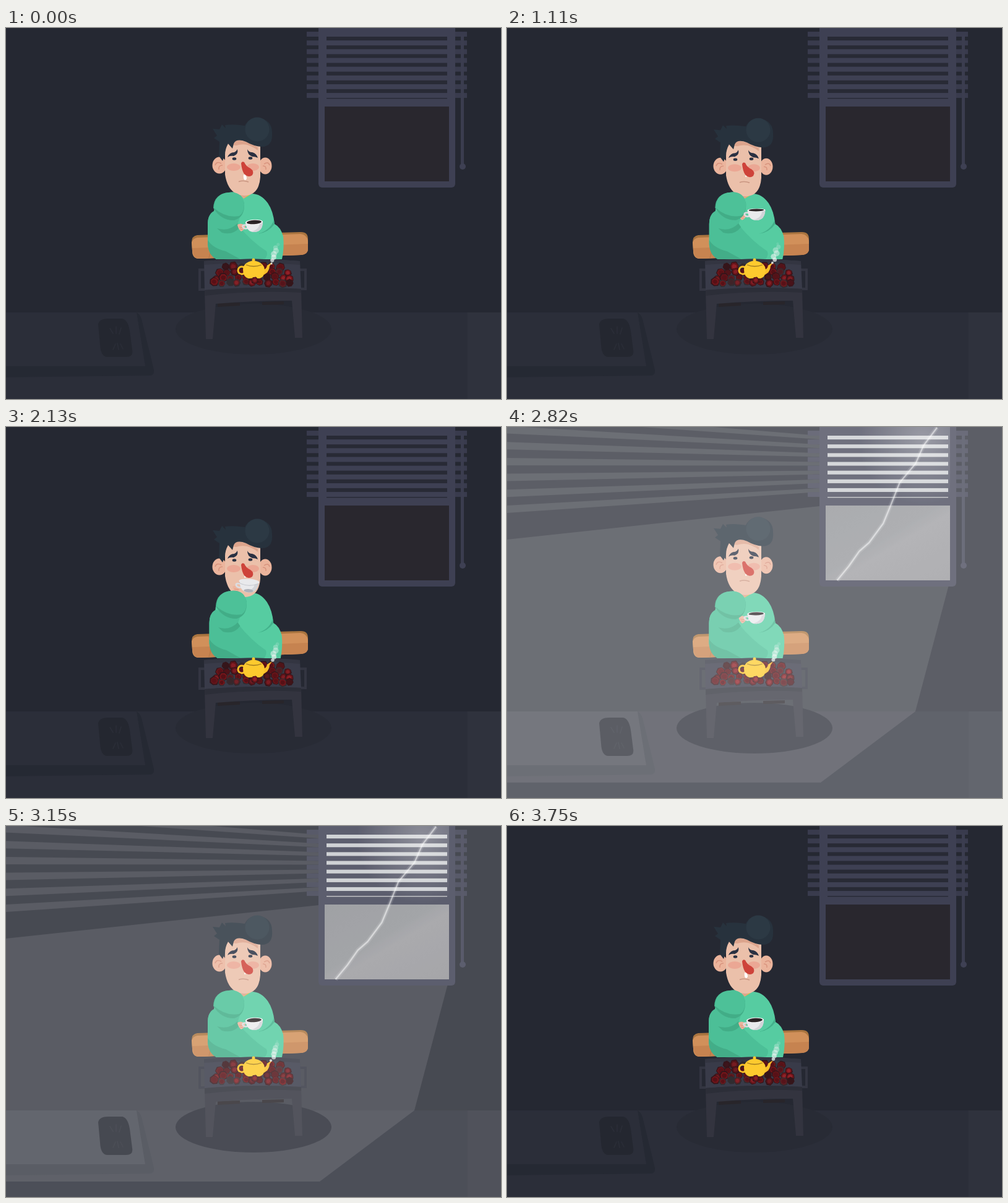
These frames come from a looping animation (800x600 px, 3.78 s). An HTML page:

```html
<!DOCTYPE html>
<html lang="en">
<head>
<meta charset="utf-8">
<title>Sick day</title>
<style>
html, body { margin: 0; width: 100%; height: 100%; overflow: hidden; background: #252832; }
svg { display: block; width: 800px; height: 600px; }
</style>
</head>
<body>
<svg viewBox="0 0 800 600">
  <rect width="800" height="600" fill="#252832"/>
  <rect y="460" width="800" height="140" fill="#2b2e39"/>
  <rect x="746" y="460" width="54" height="140" fill="#2f323d"/>
  <path d="M211 460Q217 464 219 471L239 553Q240 562 232 562L0 565V547H225Z" fill="#252933"/>

  <!-- light thrown into the room -->
  <g id="roomLight" fill="#fff" fill-opacity=".1">
    <path d="M0 182L514 127H716V248L660 460L507 575H0Z"/>
  </g>
  <path d="M0 460H211L225 547H0Z" fill="#2b2e39"/>
  <path id="rugLight" d="M0 460H211L225 547H0Z" fill="#fff" fill-opacity=".13"/>
  <g fill="none" stroke="#2b2e38" stroke-width="1.5" stroke-linecap="round">
    <path d="M149 479Q151 470 165 470H188Q197 472 200 490L204 521Q206 532 194 532H164Q153 532 152 512Z" fill="#242730" stroke="none"/>
    <path d="M168 486L173 494M178 483V494M186 485L183 495M173 520L177 511M180 510L182 520M185 511L189 519"/>
  </g>
  <ellipse cx="400" cy="487" rx="126" ry="41" fill="#282b35"/>

  <!-- window -->
  <g id="slats" fill="#393b4d"></g>
  <rect x="505" y="-10" width="221" height="268" rx="6" fill="#3e4053"/>
  <rect x="515" y="127" width="201" height="121" fill="#29272e"/>
  <rect x="518" y="113" width="195" height="1.5" fill="#292b37"/>
  <g id="gaps" fill="#282a35"></g>
  <path d="M737.500 12V220" stroke="#3b3d4f" stroke-width="5"/>
  <circle cx="738" cy="224" r="5" fill="#3e4053"/>
  <g id="sky">
    <rect x="515" y="127" width="201" height="121" fill="url(#glass)"/>
    <g id="skyGaps" fill="#c6c9cd"></g>
    <rect x="518" y="113" width="195" height="1.500" fill="#b5b7bb"/>
    <rect x="515" y="0" width="201" height="248" fill="url(#glow)"/>
    <g fill="none" stroke="#fff" stroke-linejoin="round">
      <path id="halo" stroke-width="7" stroke-opacity=".13"/>
      <path id="bolt" stroke-width="2.500" stroke-opacity=".5"/>
    </g>
  </g>

  <!-- bolster -->
  <path d="M342 445L378 444V449L342 451ZM414 443L449 442V447L414 448Z" fill="#28252a"/>
  <path d="M309 335L475 330Q488 329 488 341V357Q488 366 477 367L312 373Q301 373 301 360L300 347Q300 336 309 335Z" fill="#a9743f"/>
  <path d="M309 339L476 333Q486 334 488 344V357Q488 366 477 367L312 373Q301 373 301 360L300 347Q302 340 309 339Z" fill="#d1905a"/>
  <path d="M301 356L488 349V357Q488 366 477 367L312 373Q302 373 301 356Z" fill="#c68350"/>
  <path d="M328 338Q334 354 328 372" fill="none" stroke="#b97a48" stroke-width="1.500"/>

  <!-- man -->
  <g id="body">
    <path d="M372 262H396V280H372Z" fill="#dca58c"/>
    <path d="M376 268L384 276L394 268L390 284H376Z" fill="#f4bd2b"/>
    <path d="M376 267L384 276L397 268Q412 268 423 283Q432 296 434 317Q444 322 448 337Q450 355 446 374H340Q328 366 326 350V317Q326 302 336 297Q338 270 361 266Q370 264 376 267Z" fill="#56cca1"/>
    <path d="M434 317Q424 331 407 333Q426 328 433 311Z" fill="#43b18b"/>
    <path d="M336 296Q326 301 326 318V350Q328 366 340 374H418Q424 367 421 361Q396 345 374 318L380 300Z" fill="#4cbf97"/>
    <path d="M326 343Q334 356 355 361L379 374H340Q327 367 326 350Z" fill="#43ad88"/>
    <path d="M341 324Q360 330 374 316L378 322Q367 336 349 331Z" fill="#42ad87"/>
  </g>
  <g id="head">
    <ellipse cx="345" cy="222" rx="11.500" ry="13.500" fill="#ebb49c"/>
    <ellipse cx="419" cy="223" rx="10.500" ry="13.500" fill="#ebb49c"/>
    <path d="M338 222Q340 215 348 219M344 229Q343 222 350 222M426 222Q424 215 417 220M420 229Q421 223 415 223" fill="none" stroke="#d8937d" stroke-width="1.500"/>
    <path d="M354 180H411V241Q409 271 385 271Q359 270 354 237Z" fill="#ebc0aa"/>
    <path d="M358 188Q374 173 407 193V198Q390 184 372 190Z" fill="#dca48c"/>
    <ellipse cx="368" cy="225" rx="11" ry="6" fill="#eba794"/>
    <ellipse cx="399" cy="225" rx="10" ry="6" fill="#eba794"/>
    <path d="M358 209Q361 201 369 201Q372 200 374 196Q376 204 368 207Q362 206 358 209ZM390 196Q392 201 398 201Q405 203 407 210Q403 208 398 208Q390 205 390 196Z" fill="#2a3142"/>
    <ellipse cx="369" cy="211.500" rx="3.300" ry="2.200" fill="#2a3142"/>
    <ellipse cx="395" cy="210.500" rx="3.300" ry="2.200" fill="#2a3142"/>
    <path d="M376 248.500Q384 246 392 249" fill="none" stroke="#c99581" stroke-width="1.500"/>
    <path id="drip" d="M-2 0Q-3 7 0 9Q3 9 3 5Q2 2 1 0Z" fill="#fff"/>
    <path d="M380 219Q381 215 385 217Q388 224 395 227Q402 232 398 238Q392 243 385 236Q381 230 380 219Z" fill="#ce433a"/>
    <path d="M344 207L345 184L336 178L341 174L334 163L345 164L349 156L355 162L354 157Q367 155 386 158Q392 145 408 145Q430 149 430 169Q432 192 413 192Q400 191 388 184Q372 178 368 187L366 195L359 187Q354 196 354 205L350 215Z" fill="#27323d"/>
    <circle cx="406" cy="164" r="19.500" fill="#2c3944"/>
  </g>
  <g id="hand">
    <path d="M-6 -4Q-1 -7 4 -4L7 -1Q5 5 0 7Q-5 3 -6 -4Z" fill="#edb49d"/>
    <path d="M-3 0L4 1M-2 3L3 4" stroke="#d9937c"/>
  </g>
  <g id="arm">
    <path d="M335 291Q336 268 360 266Q380 264 385 284Q386 306 369 311Q348 312 335 291Z" fill="#42ad87"/>
    <path d="M336 291Q337 268 360 266Q382 264 385 285Q385 299 377 304Q355 308 336 291Z" fill="#4dc198"/>
  </g>
  <g id="cup">
    <path d="M-13 4Q-21 3 -18 8Q-15 11 -11 9" fill="none" stroke="#dcdce0" stroke-width="2.500"/>
    <path d="M-14 0Q-13 16 0 16Q13 16 14 0Z" fill="#e9e9ec"/>
    <path d="M14 0Q13 16 0 16L-5 15Q9 12 9 0Z" fill="#d2d3d8"/>
    <ellipse id="rim" rx="14" fill="#f4f4f5"/>
    <ellipse id="coffee" rx="12" fill="#2b2326"/>
    <g id="under">
      <ellipse rx="15" ry="4" fill="#e9e9ec"/>
      <path d="M-14 3Q0 9 14 2" fill="none" stroke="#c9cbd1"/>
      <ellipse cy="13.500" rx="7" ry="2.500" fill="#afb2ba"/>
    </g>
  </g>

  <!-- brazier -->
  <path d="M321 391H313V423H321M475 391H484V422H475" fill="none" stroke="#333541" stroke-width="4"/>
  <path d="M320 377Q398 370 475 377L477 422Q398 418 321 424Z" fill="#393b49"/>
  <path d="M320 377Q398 370 475 377V383Q398 376 320 383Z" fill="#333541"/>
  <path d="M321 424Q398 417 477 422L479 501H467L462 441Q398 441 339 446L334 503H323Z" fill="#33343f"/>
  <path d="M321 424Q398 417 477 422V428Q398 424 321 433Z" fill="#2c2e38"/>
  <g id="coalsBack"></g>
  <g id="pot">
    <circle cx="381" cy="392" r="6" fill="none" stroke="#f9bf28" stroke-width="3"/>
    <path d="M412 391Q421 392 422 384L430 379L426 385Q424 400 411 400Z" fill="#f9bf28"/>
    <path d="M383 391Q383 379 400 376Q417 379 418 391Q418 403 410 405H391Q383 402 383 391Z" fill="#fdca2e"/>
    <circle cx="400" cy="375" r="2.500" fill="#fdca2e"/>
    <path d="M388 383Q400 388 413 383" fill="none" stroke="#a07a20" stroke-width="1.300"/>
  </g>
  <g id="coalsFront"></g>
  <g id="steam" fill="#eef4f3"></g>
  <rect id="flash" width="800" height="600" fill="#fff" opacity="0"/>

  <defs>
    <linearGradient id="glass" x1="0" y1="0" x2="1" y2="1">
      <stop offset="0" stop-color="#8d8f93"/>
      <stop offset=".45" stop-color="#929498"/>
      <stop offset=".55" stop-color="#9a9a9e"/>
      <stop offset="1" stop-color="#949498"/>
    </linearGradient>
    <radialGradient id="glow" gradientUnits="userSpaceOnUse" cx="672" cy="20" r="105">
      <stop offset="0" stop-color="#fff" stop-opacity=".3"/>
      <stop offset="1" stop-color="#fff" stop-opacity="0"/>
    </radialGradient>
  </defs>
</svg>
<script>
const LOOP = 3780;
const $ = id => document.getElementById(id);
const set = (el, attrs) => {
  for (const k in attrs) el.setAttribute(k, attrs[k]);
  return el;
};
const add = (parent, tag, attrs) =>
  parent.appendChild(set(document.createElementNS('http://www.w3.org/2000/svg', tag), attrs));

let seed = 11;
const rand = () => (seed = seed * 16807 % 2147483647) / 2147483647;

// Linear interpolation over [time, value] steps
const track = (steps, t) => {
  if (t <= steps[0][0]) return steps[0][1];
  for (let i = 1; i < steps.length; i++) {
    const [a, x] = steps[i - 1], [b, y] = steps[i];
    if (t <= b) return x + (y - x) * (t - a) / (b - a);
  }
  return steps[steps.length - 1][1];
};
const ease = p => (1 - Math.cos(Math.PI * p)) / 2;

const LIFT = [[810, 0], [1620, 1], [2220, 1], [3060, 0]];
const DRIP = [[600, 1], [1000, .35], [3290, .35], [3720, 1]];
const FLASH = [[2730, 0], [2820, .25], [2910, .33], [3000, .31], [3150, .16], [3255, 0]];
const LIT = [[2715, 0], [2775, 1], [3230, 1], [3320, 0]];
const BOLT = [[695, 1], [673, 30], [660, 59], [634, 90], [620, 125], [607, 156], [584, 187], [568, 201], [551, 225], [532, 248]];

// Blinds and the stripes they let through
for (let i = 0; i < 8; i++) {
  const y = 6 + i * 14.15;
  add($('slats'), 'rect', { x: 486, y, width: 259, height: 8 });
  if (i == 7) break;
  for (const id of ['gaps', 'skyGaps'])
    add($(id), 'rect', { x: 518, y: y + 8, width: 195, height: 6.15 });
  const left = 127 - (6 - i) * 25.7;
  add($('roomLight'), 'path', { d: `M0 ${left}L505 ${y + 8}V${y + 14}L0 ${left + 12}Z` });
}

// Coals: a dark lump with a pulsing red face
const embers = [];
const coal = (group, x, y) => {
  const r = 6 + rand() * 2.2, turn = rand() * 6.28;
  const shape = k => Array.from({ length: 7 }, (_, i) => {
    const a = turn + i * Math.PI / 3.5, d = r * k * (.88 + rand() * .2);
    return `${(x + d * Math.cos(a)).toFixed(1)},${(y + d * Math.sin(a)).toFixed(1)}`;
  }).join(' ');
  add(group, 'polygon', { points: shape(1), fill: rand() < .3 ? '#302c30' : '#35151a' });
  const base = rand() < .22 ? .12 : .55 + rand() * .35;
  const parts = [
    add(group, 'polygon', { points: shape(.8), fill: '#75151a' }),
    add(group, 'polygon', { points: shape(.5), fill: rand() < .4 ? '#98232a' : '#551016' })
  ];
  embers.push({ parts, base, phase: rand() * 6.28, beats: 2 + Math.floor(rand() * 4) });
};
[[386, 357, 442, 8], [395, 344, 454, 10], [404, 338, 459, 11], [412, 338, 459, 11]].forEach(([y, a, b, n], row) => {
  for (let i = 0; i < n; i++) {
    const x = a + (b - a) * i / (n - 1) + rand() * 4 - 2;
    const front = row == 3 || row == 2 && (x < 380 || x > 418);
    coal($(front ? 'coalsFront' : 'coalsBack'), x, y + rand() * 4 - 2);
  }
});
coal($('coalsFront'), 402, 408);

const PUFFS = 7;
const puffs = Array.from({ length: PUFFS }, () => add($('steam'), 'circle', {}));

function draw(t) {
  const u = ease(track(LIFT, t));
  const move = (id, x, y, rest = '') => $(id).setAttribute('transform', `translate(${x} ${y}) ${rest}`);

  move('body', 390, 0, `scale(${1 - .04 * u} 1) translate(-390 0)`);
  move('head', 0, 4 * u);
  move('arm', 4 * u, -u);
  move('hand', 380 + 3 * u - 11 * u * u, 322 - 60 * u);
  move('cup', 401 + 13 * u - 21 * u * u, 314 - 64 * u, `rotate(${-3 + 7 * u}) scale(${1 + .1 * u})`);
  const open = Math.max(0, 1 - 1.3 * u);
  set($('rim'), { ry: 4.2 * open });
  set($('coffee'), { ry: 3.2 * open });
  $('under').setAttribute('opacity', Math.max(0, Math.min(1, (u - .65) * 4)));
  move('drip', 386, 237, `scale(${track(DRIP, t)})`);

  const lit = track(LIT, t);
  for (const id of ['roomLight', 'rugLight', 'sky']) $(id).setAttribute('opacity', lit);
  $('flash').setAttribute('opacity', track(FLASH, t));
  const sway = Math.sin(t / 48) * 2;
  const d = 'M' + BOLT.map(([x, y]) => `${x + sway * y / 248} ${y}`).join('L');
  set($('bolt'), { d });
  set($('halo'), { d });

  const w = t / LOOP * Math.PI * 2;
  for (const e of embers) {
    const glow = e.base + .2 * Math.sin(w * e.beats + e.phase);
    for (const part of e.parts) part.setAttribute('opacity', Math.max(0, glow));
  }
  puffs.forEach((puff, i) => {
    const p = (t / (LOOP / 4) + i / PUFFS) % 1;
    set(puff, {
      cx: 429 + 11 * p + 1.8 * Math.sin(p * 9 + i * 2),
      cy: 381 - 36 * p,
      r: 1.6 + 3.2 * Math.sin(Math.PI * Math.min(1, p * 1.05)),
      opacity: .85 * Math.pow(1 - p, .9)
    });
  });
}

const start = performance.now();
function tick() {
  draw((performance.now() - start) % LOOP);
  requestAnimationFrame(tick);
}
tick();
</script>
</body>
</html>
```
